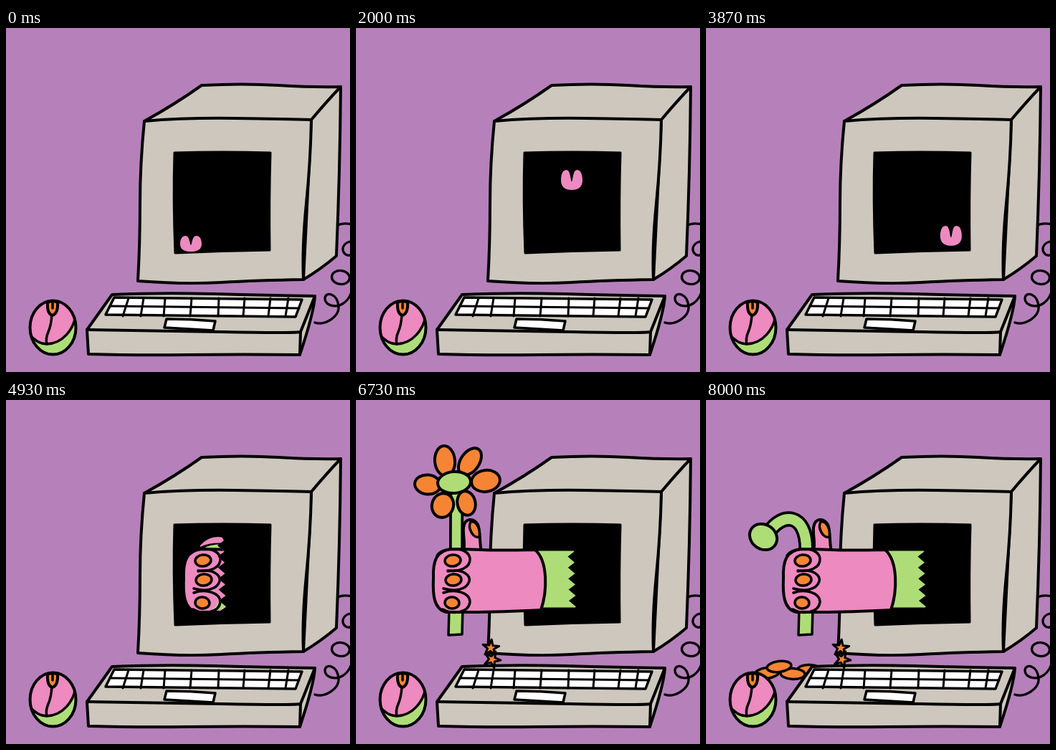
Animation of 480 by 480 pixels, one loop 9.07 s. Source, as an HTML page with a canvas:

```html
<!DOCTYPE html>
<html lang="en">
<head>
<meta charset="utf-8">
<title>Flower from the screen</title>
<style>
html, body { margin: 0; width: 100%; height: 100%; overflow: hidden; background: #b681bb; }
canvas { display: block; width: 100vw; height: 100vh; }
</style>
</head>
<body>
<canvas id="stage"></canvas>
<script>
const LOOP = 9070, STEP = 1000 / 15, LAST = 120;
const INK = '#000', GRAY = '#cdc7bd', PINK = '#ed8ac0', GREEN = '#aedd78', ORANGE = '#f58534';
const canvas = document.getElementById('stage');
const ctx = canvas.getContext('2d');

const clamp = v => Math.max(0, Math.min(1, v));
const mix = (a, b, p) => a + (b - a) * p;
const ease = p => p * p * (3 - 2 * p);

// Piecewise linear value through [time, value] pairs.
function track(k, keys) {
  for (let i = 1; i < keys.length; i++) {
    const [a, u] = keys[i - 1], [b, v] = keys[i];
    if (k <= b) return mix(u, v, clamp((k - a) / (b - a)));
  }
  return keys[keys.length - 1][1];
}

function paint(path, fill, width = 4) {
  if (fill) { ctx.fillStyle = fill; ctx.fill(path); }
  if (width) { ctx.strokeStyle = INK; ctx.lineWidth = width; ctx.stroke(path); }
}
const draw = (d, fill, width) => paint(new Path2D(d), fill, width);

function oval(x, y, rx, ry, rot = 0, fill = null, width = 4) {
  const p = new Path2D();
  p.ellipse(x, y, rx, ry, rot, 0, Math.PI * 2);
  paint(p, fill, width);
}

function at(x, y, rot, fn) {
  ctx.save();
  ctx.translate(x, y);
  ctx.rotate(rot);
  fn();
  ctx.restore();
}

function monitor() {
  draw('M462 276Q469 271 484 274M484 298C470 297 465 312 476 317Q480 318 484 315', null, 3.3);
  oval(467, 348, 12.5, 9.5, 0.1, null, 3.3);
  draw('M431 411C444 416 466 403 464 388C462 370 446 367 445 377C445 391 472 394 481 371', null, 3.3);
  draw('M193 130Q235 107 273 80Q330 77 380 80T467 82Q466 200 461 318Q440 336 415 351L426 128Z', GRAY);
  draw('M193 130Q250 125 320 126T426 128Q425 185 419 245T415 351Q350 352 300 355T184 353Q187 300 187 245T193 130Z', GRAY);
  draw('M426 128Q447 103 467 82');
  draw('M235 174Q300 172 369 174Q367 240 368 310Q300 311 236 314Q233 240 235 174Z', INK, 3);
}

function keyboard() {
  draw('M113 421Q131 396 148 372Q215 369 290 371T431 374Q430 396 410 456Q330 455 255 456T115 455Z', GRAY);
  draw('M113 421Q200 422 300 424T411 424L431 374M411 424L410 456');
  draw('M151 376Q280 377 413 379L404 403Q270 402 139 400Z', '#fff', 3.5);
  draw('M145 388Q280 389 409 391', null, 3);
  for (const [a, b] of [[171, 163], [192, 188], [222, 220], [259, 257], [297, 296], [333, 331], [369, 366], [394, 390]])
    draw(`M${a} 377L${b} 402`, null, 3);
  draw('M224 406Q258 406 292 409L289 422Q255 420 221 418Z', '#fff', 3.5);
}

function mouse() {
  const body = new Path2D();
  body.ellipse(65.5, 418, 32, 37.5, 0, 0, Math.PI * 2);
  paint(body, GREEN, 0);
  ctx.save();
  ctx.clip(body);
  draw('M28 421Q41 441 57 441C80 440 94 420 97 402L100 370L28 370Z', PINK, 3.5);
  ctx.restore();
  paint(body, null, 4);
  draw('M64 400Q63 415 59 424T57 441', null, 3.5);
  draw('M58 383Q57 399 65 401Q73 398 72 383Q65 379 58 383Z', ORANGE, 4);
  draw('M65 382L65 391', null, 3.5);
}

// Small heart hopping from side to side.
function heart(k) {
  const phase = k / 20 * Math.PI;
  const lift = 86 * Math.sin(phase) ** 2;
  const h = 22 + Math.min(6, lift * 0.7);
  ctx.save();
  ctx.translate(301 - 43 * Math.cos(phase), 312 - lift);
  ctx.scale(15, h);
  draw('M0 -.42C.12 -.42 .08 -1 .5 -1C.92 -1 1 -.68 1 -.48C1 -.14 .6 0 0 0C-.6 0 -1 -.14 -1 -.48C-1 -.68 -.92 -1 -.5 -1C-.08 -1 -.12 -.42 0 -.42Z', PINK, 0);
  ctx.restore();
}

function tearClip() {
  const p = new Path2D('M0 0L300 0L300 189');
  for (let i = 0; i < 7; i++) {
    p.lineTo(304 + i * 0.5, 196 + i * 15.4);
    p.lineTo(295 + i * 0.4, 203 + i * 15.4);
  }
  p.lineTo(295, 480);
  p.lineTo(0, 480);
  ctx.clip(p);
}

function hand(dx) {
  const hidden = dx > 60;
  ctx.save();
  tearClip();
  ctx.translate(dx, 0);
  if (hidden) {
    draw('M131 203Q146 186 168 193L180 193L180 202Q150 196 131 205Z', PINK, 0);
    draw('M134 208Q148 198 180 203L180 214L134 214Z', GREEN, 0);
  } else {
    draw('M150 211C153 200 149 190 150 178C152 164 164 164 170 174C174 184 172 200 175 211Z', PINK);
    draw('M160 170C168 168 174 180 172 191C164 194 155 179 160 170Z', ORANGE, 3.5);
  }
  draw('M245 209L330 209L330 291L245 291Z', GREEN, 3);
  draw('M133 208Q155 208 175 209T250 209C268 225 267 267 258 293Q200 296 160 296T126 296C108 292 107 270 108 249C107 225 112 210 133 208Z', PINK);
  if (hidden) draw('M149 292L158 280L185 280L185 292Z', GREEN, 0);
  draw('M113 217C122 204 157 204 159 221C160 235 143 240 128 238M128 239C150 235 160 245 158 253C154 266 136 267 122 263M122 269C139 263 159 269 159 282C157 297 135 300 121 292', null, 3.5);
  oval(135, 224, 11, 8, -0.1, ORANGE, 3.5);
  oval(136, 251, 11, 8, -0.1, ORANGE, 3.5);
  oval(134, 283, 10, 8, 0.1, ORANGE, 3.5);
  ctx.restore();
}

function stem(grow, droop, dx) {
  const top = mix(212, 116, grow);
  const end = [mix(141, 88, droop) - 12 * Math.sin(droop * Math.PI), mix(top, 184, droop)];
  const p = new Path2D();
  p.moveTo(140 + dx, 225);
  p.lineTo(140 + dx, 208);
  p.bezierCurveTo(140 + dx, mix(mix(212, 180, grow), 157, droop),
    mix(140, 106, droop) + dx, mix(mix(212, 150, grow), 157, droop), end[0] + dx, end[1]);
  const width = mix(20, 21.5, droop);
  ctx.lineCap = 'butt';
  paint(p, null, width);
  ctx.strokeStyle = GREEN;
  ctx.lineWidth = width - 7.5;
  ctx.stroke(p);
  ctx.lineCap = 'round';
  const tail = mix(294, 328, clamp(grow));
  draw(`M${130 + dx} 290L${129 + dx} ${tail}L${148 + dx} ${tail - 1}L${149 + dx} 290Z`, GREEN, 3.5);
  return [mix(end[0] - 4, 80, droop) + dx, mix(end[1] - 1, 191, droop)];
}

// Bloom place and size, place while falling with size and tilt, resting place.
const petals = [
  { x: 124, y: 85, rx: 14, ry: 21, rot: -0.08, fx: 107, fy: 248, w: 32, h: 40, tilt: -0.18, ex: 102, ey: 372 },
  { x: 159, y: 86, rx: 13, ry: 21, rot: 0.6, fx: 162, fy: 250, w: 37, h: 45, tilt: 0.2, ex: 165, ey: 396 },
  { x: 100, y: 118, rx: 18, ry: 13.5, rot: 0.1, fx: 91, fy: 302, w: 27, h: 37, tilt: -0.08, ex: 85, ey: 381 },
  { x: 181, y: 113, rx: 20, ry: 15, rot: -0.15, fx: 181, fy: 298, w: 28, h: 38, tilt: -0.16, ex: 181, ey: 398 },
  { x: 121, y: 147, rx: 15, ry: 17, rot: 0.3, fx: 121, fy: 336, w: 31, h: 35, tilt: 0, ex: 121, ey: 382 },
  { x: 154, y: 144, rx: 12.5, ry: 17, rot: -0.2, fx: 153, fy: 332, w: 27, h: 32, tilt: -0.1, ex: 145, ey: 377 }
];

function tornPetal(w, h) {
  ctx.scale(w, h);
  const p = new Path2D('M-.5 -.45L-.35 -.34L-.2 -.49L-.05 -.34L.1 -.49L.23 -.34L.42 -.46C.6 0 .48 .5 0 .5C-.44 .5 -.58 .04 -.5 -.45Z');
  const out = new Path2D();
  out.addPath(p, ctx.getTransform());
  const s = canvas.width / 480;
  ctx.setTransform(1, 0, 0, 1, 0, 0);
  paint(out, ORANGE, 3.5 * s);
}

function fallingPetal(p, k) {
  const n = (k - 101) / 8;
  if (n <= 1) {
    const base = Math.atan2(p.x - 137, p.y - 116);
    const turn = mix(-base, p.tilt, ease(clamp(n * 1.6)));
    at(mix(p.x, p.fx, n), mix(p.y, p.fy, n * n), turn, () => tornPetal(p.w, p.h));
    return;
  }
  const q = clamp((k - 109) / 3);
  const x = mix(p.fx, p.ex, q), y = mix(p.fy, p.ey, q);
  if (q < 1) at(x, y, p.tilt, () => tornPetal(p.w, p.h * mix(1, 0.75, q)));
  else oval(x, y, 17, 7.5, x < 110 ? -0.12 : 0.05, ORANGE, 3.5);
}

function star(x, y, rot) {
  let d = '';
  for (let i = 0; i < 10; i++) {
    const r = i % 2 ? 4.5 : 12, a = i * Math.PI / 5;
    d += (i ? 'L' : 'M') + r * Math.sin(a) + ' ' + -r * Math.cos(a);
  }
  at(x, y, rot, () => draw(d + 'Z', ORANGE, 3));
}

function flower(k, dx) {
  const grow = track(k, [[76, 0], [80, 1.12], [82, 0.97], [83, 1]]);
  const droop = ease(clamp((k - 112) / 8));
  const [hx, hy] = stem(grow, droop, dx);
  const size = clamp(grow);
  if (k <= 101) at(hx, hy, 0, () => {
    ctx.scale(size, size);
    for (const p of petals) oval(p.x - 137, p.y - 115, p.rx, p.ry, p.rot, ORANGE);
  });
  oval(hx, hy, mix(23, 20, droop) * size, mix(15, 17, droop) * size, mix(-0.08, 0.6, droop), GREEN);
}

function scene(k) {
  const s = canvas.width / 480;
  ctx.setTransform(s, 0, 0, canvas.height / 480, 0, 0);
  ctx.lineCap = ctx.lineJoin = 'round';
  ctx.fillStyle = '#b681bb';
  ctx.fillRect(0, 0, 480, 480);
  monitor();
  if (k < 72) heart(k);
  else {
    const dx = track(k, [[72, 190], [74, 140], [77, 0], [78, -16], [80, 0]]);
    if (k > 78) star(188, track(k, [[78, 270], [83, 308], [86, 346]]), 0.1);
    if (k > 76) flower(k, dx);
    hand(dx);
    if (k > 101) petals.slice().reverse().forEach(p => fallingPetal(p, k));
  }
  keyboard();
  mouse();
  if (k > 78) star(190, track(k, [[78, 285], [82, 362]]), 0.4);
}

function fit() {
  const d = window.devicePixelRatio || 1;
  const w = Math.round(innerWidth * d), h = Math.round(innerHeight * d);
  if (canvas.width !== w || canvas.height !== h) { canvas.width = w; canvas.height = h; }
}

const start = performance.now();
function tick() {
  fit();
  const ms = Math.max(0, performance.now() - start) % LOOP;
  scene(Math.min(LAST, Math.floor((ms + 4) / STEP)));
  requestAnimationFrame(tick);
}
tick();
</script>
</body>
</html>
```
